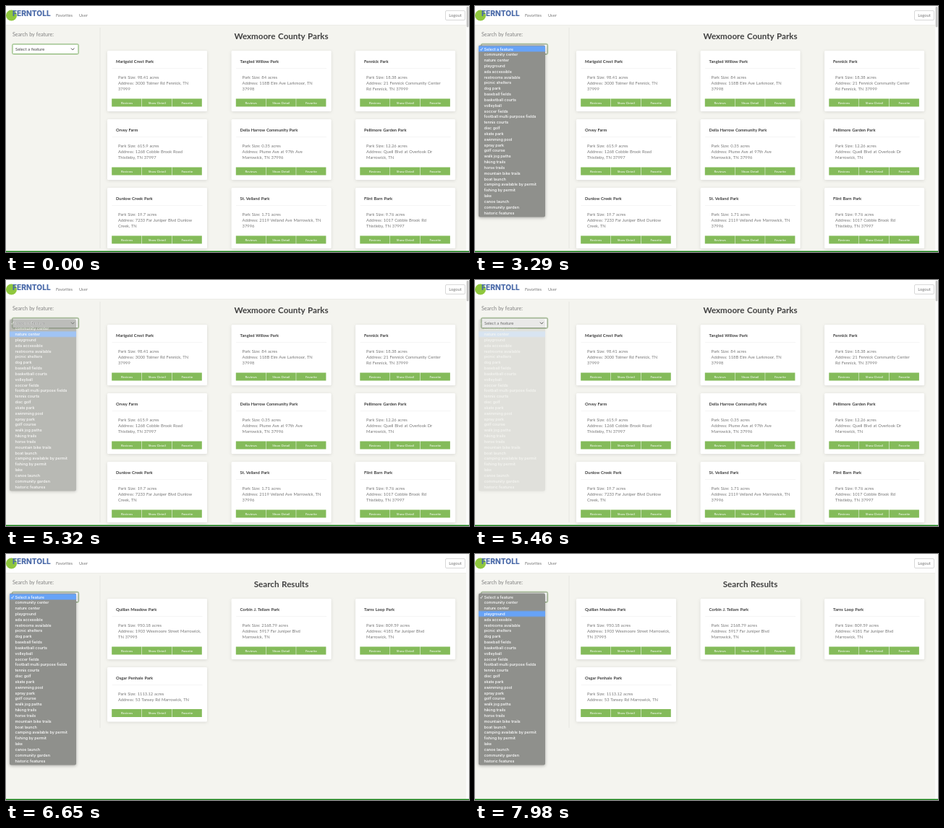
Write an HTML page that moves like this. It is 640 px wide and 341 px high and loops after 8 s.

```html
<!DOCTYPE html>
<html lang="en">
<head>
<meta charset="utf-8">
<title>Park finder</title>
<style>
  html, body { margin: 0; width: 100%; height: 100%; overflow: hidden; background: #f4f4ef; }
  svg { display: block; width: 640px; height: 341px; }
  text { font: 5.8px Lato, sans-serif; word-spacing: .07em; fill: #777; white-space: pre; }
  .mid { text-anchor: middle; }
  .brand { font: 800 10.2px Inter, sans-serif; fill: #4969a8; }
  .heading { font-size: 11.6px; font-weight: 700; fill: #404040; }
  .label { font-size: 7.1px; fill: #808080; }
  .title { font-weight: 700; fill: #3c3c3c; }
  .btn { font-size: 4.5px; fill: #fff; }
  .dark { fill: #444; }
  .card { fill: #fff; filter: drop-shadow(0 1.5px 2px rgba(0, 0, 0, .11)); }
  .menu text { font: 500 5.4px Inter, sans-serif; word-spacing: 0; fill: #fff; }
  .panel { filter: drop-shadow(0 1.5px 2px rgba(0, 0, 0, .3)); }
</style>
</head>
<body>
<script>
const LOOP = 8000;
const OPEN = 3150, FADE = 5180, CLOSED = 5530, RESULTS = 5600, REOPEN = 6370;
const GREEN = '#84bb5a';
const COLS = [140, 311.6, 483.1];
const ROWS = [62, 157, 252];
const PITCH = 7.83;

const PARKS = [
  ['Marigold Crest Park', '98.41', '3000 Tolmer Rd Fennick, TN', '37999'],
  ['Tangled Willow Park', '84', '118B Elm Ave Larkmoor, TN', '37998'],
  ['Fennick Park', '18.38', '21 Fennick Community Center', 'Rd Fennick, TN 37999'],
  ['Orvey Farm', '615.9', '1268 Cobble Brook Road', 'Thistleby, TN 37997'],
  ['Della Harrow Community Park', '0.35', 'Plume Ave at 97th Ave', 'Marrowick, TN 37996'],
  ['Pellimore Garden Park', '12.26', 'Quell Blvd at Overlook Dr', 'Marrowick, TN'],
  ['Dunlow Creek Park', '19.7', '7233 Far Juniper Blvd Dunlow', 'Creek, TN'],
  ['St. Velland Park', '1.71', '2119 Velland Ave Marrowick, TN', '37996'],
  ['Flint Barn Park', '9.76', '1017 Cobble Brook Rd', 'Thistleby, TN 37997']
];
const FOUND = [
  ['Quillan Meadow Park', '950.18', '1903 Wexmoore Street Marrowick,', 'TN 37995'],
  ['Corbin J. Tellam Park', '2168.79', '5917 Far Juniper Blvd', 'Marrowick, TN'],
  ['Tarns Loop Park', '809.59', '4181 Far Juniper Blvd', 'Marrowick, TN'],
  ['Osgar Penhale Park', '1113.12', '53 Tansey Rd Marrowick, TN']
];
const FEATURES = ['Select a feature', 'community center', 'nature center', 'playground',
  'ada accessible', 'restrooms available', 'picnic shelters', 'dog park', 'baseball fields',
  'basketball courts', 'volleyball', 'soccer fields', 'football multi purpose fields',
  'tennis courts', 'disc golf', 'skate park', 'swimming pool', 'spray park', 'golf course',
  'walk jog paths', 'hiking trails', 'horse trails', 'mountain bike trails', 'boat launch',
  'camping available by permit', 'fishing by permit', 'lake', 'canoe launch',
  'community garden', 'historic features'];

function add(parent, tag, attrs = {}, content = '') {
  const el = document.createElementNS('http://www.w3.org/2000/svg', tag);
  for (const key in attrs) el.setAttribute(key, attrs[key]);
  el.textContent = content;
  parent.append(el);
  return el;
}
const rect = (p, x, y, width, height, fill, more) =>
  add(p, 'rect', { x, y, width, height, fill, ...more });
// y is the visual middle of the line
const text = (p, x, y, str, cls = '', drop = 2) =>
  add(p, 'text', { x, y: y + drop, class: cls }, str);

// Steps are [time, value]; each value holds until the next step.
function hold(el, prop, steps) {
  const frames = steps.map(([t, v]) =>
    ({ offset: t / LOOP, [prop]: v, easing: 'steps(1, end)' }));
  frames.push({ offset: 1, [prop]: steps[steps.length - 1][1] });
  el.animate(frames, { duration: LOOP, iterations: Infinity });
}

function card(parent, [name, size, ...address], i) {
  const x = COLS[i % 3], y = ROWS[Math.floor(i / 3)];
  const short = address.length < 2 ? 8.5 : 0;
  rect(parent, x, y, 138, 84 - short, '#fff', { rx: 1.5, class: 'card' });
  text(parent, x + 12, y + 15, name, 'title');
  rect(parent, x + 6.5, y + 24, 125, .6, '#efefef');
  const lines = [`Park Size: ${size} acres`, `Address: ${address[0]}`, ...address.slice(1)];
  lines.forEach((line, n) => text(parent, x + 15, y + 36.6 + n * 8.4, line));
  const by = y + 66.5 - short;
  ['Reviews', 'Show Detail', 'Favorite'].forEach((label, n) => {
    rect(parent, x + 6.2 + n * 41.7, by, 41.2, 11, GREEN);
    text(parent, x + 27 + n * 41.7, by + 5.5, label, 'btn mid', 1.5);
  });
}

function listing(heading, parks) {
  const g = add(svg, 'g');
  text(g, 380.5, 41.5, heading, 'heading mid', 4);
  parks.forEach((park, i) => card(g, park, i));
  return g;
}

const svg = add(document.body, 'svg', { viewBox: '0 0 640 341' });
rect(svg, 0, 0, 640, 341, '#f4f4ef');
rect(svg, 636, 0, 4, 341, '#fbfbfa');

// Header
rect(svg, 0, 0, 636, 26.5, '#fff');
rect(svg, 0, 26.2, 636, .6, '#e4e4e0');
add(svg, 'circle', { cx: 7.5, cy: 13, r: 7.5, fill: '#8fc73e' });
text(svg, 9, 9.8, 'FERNTOLL', 'brand', 3.8);
text(svg, 69, 12.7, 'Favorites');
text(svg, 101, 12.7, 'User');
rect(svg, 607.5, 6.5, 27, 13, '#fff', { rx: 1.5, stroke: '#cfcfcf', 'stroke-width': .8 });
text(svg, 621, 13, 'Logout', 'mid');
const thumb = rect(svg, 636.7, 1, 2.8, 28.5, '#c2c2c2', { rx: 1.4 });

// Sidebar
text(svg, 9, 40, 'Search by feature:', 'label', 2.2);
const longRule = rect(svg, 129.6, 30, .8, 306, '#e3e3de');
const shortRule = rect(svg, 129.6, 30, .8, 211, '#e3e3de');
const ring = rect(svg, 8.2, 52.2, 92.6, 15.1, 'none', { rx: 2, stroke: '#b9d3a8', 'stroke-width': 1 });
const box = rect(svg, 9, 53, 91, 13.5, '#fff', { rx: 1.2, stroke: '#7fb068', 'stroke-width': 1 });
text(svg, 13, 59.7, 'Select a feature', 'dark');
add(svg, 'path', { d: 'M90 58.6l2.2 2.2 2.2-2.2', fill: 'none', stroke: '#444', 'stroke-width': 1 });

const filter = add(svg, 'g');
text(filter, 9, 71, 'Filtering by');
rect(filter, 9, 76, 53, 10.5, GREEN, { rx: 5.2 });
add(filter, 'path', {
  d: 'M51.5 76H57a5.2 5.2 0 0 1 0 10.5H51.5z',
  fill: '#e9efe3', stroke: '#4d4d4d', 'stroke-width': .9
});
add(filter, 'path', { d: 'M55.4 79.7l3 3m0-3l-3 3', stroke: '#777', 'stroke-width': .6 });
text(filter, 13, 81.2, 'nature center', 'btn').style.fontSize = '5.7px';

// Main content
const all = listing('Wexmoore County Parks', PARKS);
const found = listing('Search Results', FOUND);
rect(svg, 0, 339.6, 640, 1.4, '#128012');

// Native menu
const menu = add(svg, 'g', { class: 'menu' });
rect(menu, 5, 54.5, 92, 238, '#8f908c', { rx: 2, class: 'panel' });
const light = rect(menu, 5, 55.5, 92, PITCH, '#67a3f7');
add(menu, 'path', { d: 'M7.3 60l1.2 1.5 2.1-3.6', fill: 'none', stroke: '#fff', 'stroke-width': .75 });
FEATURES.forEach((name, i) => text(menu, 12.5, 59.6 + i * PITCH, name, '', 1.9));

// Timeline
const before = [[0, 1], [RESULTS, 0]];
const after = [[0, 0], [RESULTS, 1]];
const row = n => `translateY(${n * PITCH}px)`;

[all, longRule, thumb].forEach(el => hold(el, 'opacity', before));
[found, filter].forEach(el => hold(el, 'opacity', after));
hold(shortRule, 'opacity', [[0, 0], [5810, 1]]);
hold(ring, 'opacity', [[0, .35], [OPEN, 1]]);
hold(box, 'stroke', [[0, '#7fb068'], [OPEN, '#87987b'], [RESULTS, '#5f9a45'], [REOPEN, '#87987b']]);
hold(light, 'transform', [
  [0, row(0)], [3850, row(1)], [4130, row(2)],
  [RESULTS, row(0)], [7000, row(1)], [7280, row(2)], [7490, row(3)]
]);
hold(light, 'opacity', [[0, 1], [4690, 0], [4760, 1]]);

const at = (t, opacity, easing = 'steps(1, end)') => ({ offset: t / LOOP, opacity, easing });
menu.animate([
  at(0, 0), at(OPEN, 1), at(FADE, 1, 'linear'), at(CLOSED, 0), at(REOPEN, 1), at(LOOP, 1)
], { duration: LOOP, iterations: Infinity });
</script>
</body>
</html>
```
